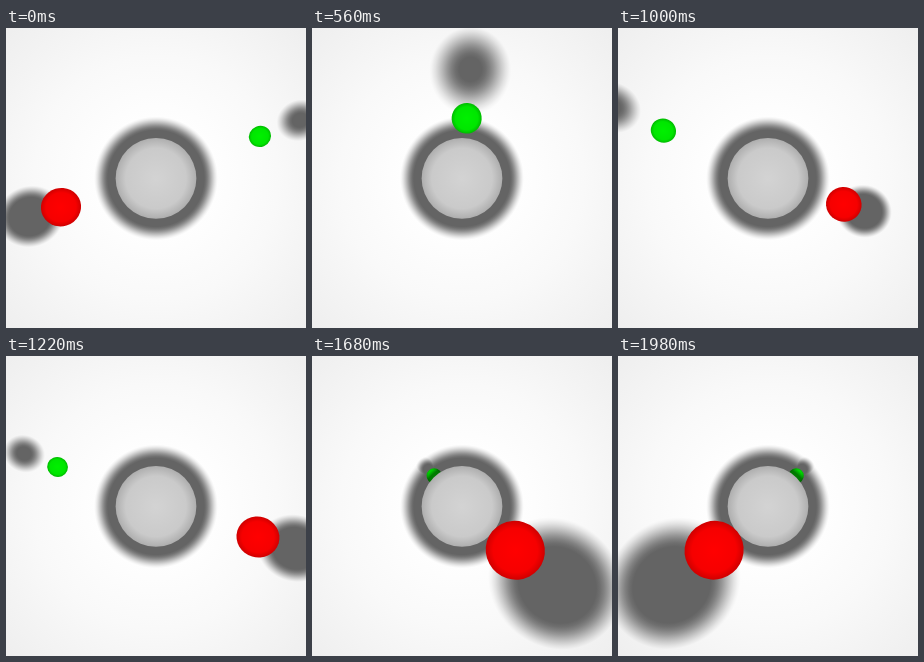
Animation, 300 px wide and 300 px high, one loop 2000 ms. Source, as an HTML page with a canvas:

```html
<!DOCTYPE html>
<html>
<head>
<meta charset="utf-8">
<title>Orbiting balls</title>
<style>
html, body { margin: 0; width: 100%; height: 100%; overflow: hidden; background: #fff; }
canvas { display: block; width: 300px; height: 300px; }
</style>
</head>
<body>
<canvas id="c" width="300" height="300"></canvas>
<script>
const ctx = document.getElementById('c').getContext('2d');
const CX = 150, CY = 150.4;
const FOCAL = 300;        // camera focal length in pixels
const LIGHT = 5;          // depth of the lamp, on the camera axis
const LAMP = 0.33;        // half size of the lamp
const WALL = 50;          // depth of the back wall
const CENTER = 15;        // depth of the orbit centre
const ORBIT = 5;
const THROW = FOCAL * (WALL - LIGHT) / WALL;
const LOOP = 2000, STEP = 20, TURN = 0.05, START = 1.431;

const gray = v => `rgb(${v},${v},${v})`;

// Outline of a sphere in central projection
function project(ball, focal, depth) {
  const { x, y, r } = ball;
  const off = Math.hypot(x, y);
  const q = depth * depth - r * r;
  const k = focal * depth / q;
  return {
    x: CX + x * k,
    y: CY - y * k,
    a: focal * r * Math.sqrt(off * off + q) / q,
    b: focal * r / Math.sqrt(q),
    angle: Math.atan2(-y, x)
  };
}

function backdrop() {
  const g = ctx.createRadialGradient(CX, CY, 60, CX, CY, 215);
  g.addColorStop(0, gray(254));
  g.addColorStop(0.4, gray(249));
  g.addColorStop(1, gray(238));
  ctx.fillStyle = g;
  ctx.fillRect(0, 0, 300, 300);
}

function shadow(ball) {
  const reach = ball.d - LIGHT;
  const p = project(ball, THROW, reach);
  const soft = LAMP * FOCAL * (WALL - ball.d) / (WALL * reach);
  const inner = Math.max(0, p.b - soft), outer = p.b + soft;
  const g = ctx.createRadialGradient(0, 0, inner, 0, 0, outer);
  for (let i = 0; i <= 8; i++) {
    const t = i / 8;
    const s = t * t * (3 - 2 * t);
    g.addColorStop(t, gray(Math.round(100 + 155 * (0.35 * t + 0.65 * s))));
  }
  ctx.save();
  ctx.globalCompositeOperation = 'darken';
  ctx.translate(p.x, p.y);
  ctx.rotate(p.angle);
  ctx.scale(p.a / p.b, 1);
  ctx.fillStyle = g;
  ctx.beginPath();
  ctx.arc(0, 0, outer, 0, 7);
  ctx.fill();
  ctx.restore();
}

function drawBall(ball) {
  const p = project(ball, FOCAL, ball.d);
  ctx.save();
  ctx.translate(p.x, p.y);
  ctx.rotate(p.angle);
  const g = ctx.createRadialGradient(0, 0, 0, 0, 0, p.b);
  ball.tones.forEach((c, i) => g.addColorStop([0, 0.75, 1][i], c));
  ctx.scale(p.a / p.b, 1);
  ctx.beginPath();
  ctx.arc(0, 0, p.b, 0, 7);
  ctx.fillStyle = g;
  ctx.fill();
  if (ball.d > CENTER + 1) {
    ctx.clip();
    ctx.setTransform(1, 0, 0, 1, 0, 0);
    shade(ball.d);
  }
  ctx.restore();
}

// Shade cast by the large sphere on whatever is behind it
function shade(d) {
  const scale = FOCAL / d;
  const rim = scale * 2 * (d - LIGHT) / Math.sqrt(96);
  const soft = scale * LAMP * (d - CENTER) / (CENTER - LIGHT);
  const g = ctx.createRadialGradient(CX, CY, rim - soft, CX, CY, rim + soft);
  g.addColorStop(0, 'rgba(0,0,0,0.48)');
  g.addColorStop(1, 'rgba(0,0,0,0)');
  ctx.fillStyle = g;
  ctx.fillRect(0, 0, 300, 300);
}

const big = { x: 0, y: 0, d: CENTER, r: 2, tones: [gray(211), gray(202), gray(174)] };
const red = { y: -1.5, r: 1, tones: ['#ff0000', '#f60000', '#cf0000'] };
const green = { y: 2, r: 0.5, tones: ['#00f000', '#00e600', '#00ba00'] };
const balls = [big, red, green];

function place(ball, angle) {
  ball.x = ORBIT * Math.sin(angle);
  ball.d = CENTER - ORBIT * Math.cos(angle);
}

function draw(ms) {
  const angle = START - TURN * Math.floor(ms % LOOP / STEP);
  place(green, angle);
  place(red, angle + Math.PI);
  backdrop();
  balls.forEach(shadow);
  [...balls].sort((a, b) => b.d - a.d).forEach(drawBall);
}

const begin = performance.now();
function tick() {
  draw(performance.now() - begin);
  requestAnimationFrame(tick);
}
tick();
</script>
</body>
</html>
```
